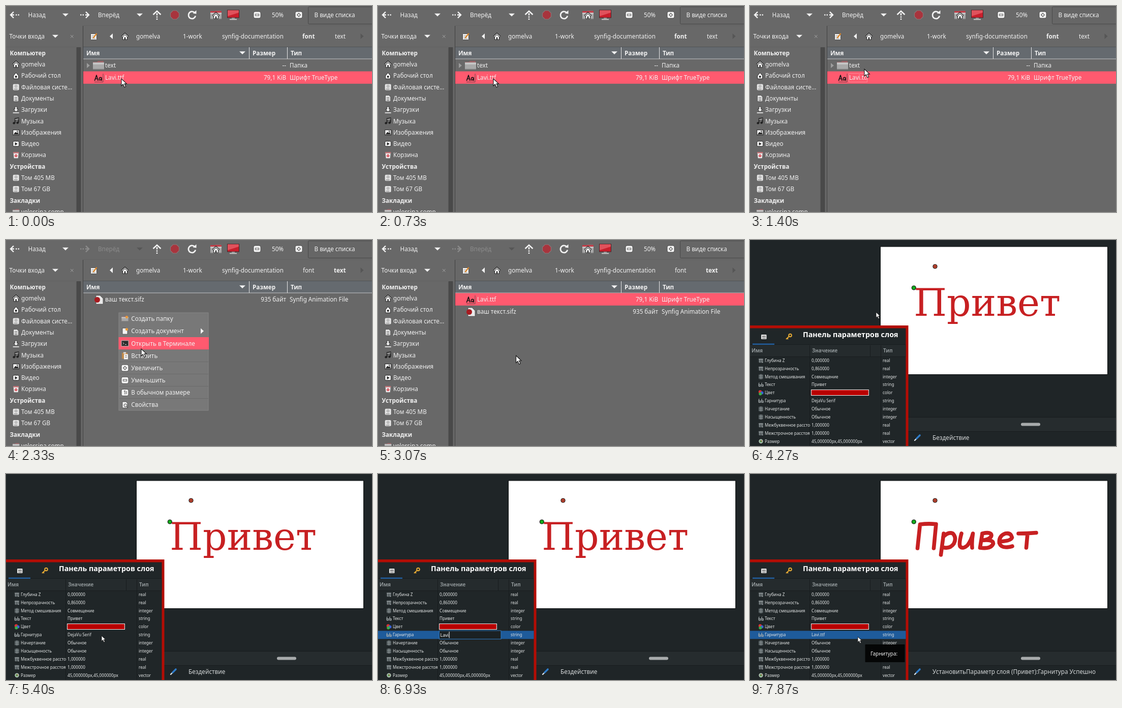
Write an HTML page that moves like this. It is 720 px wide and 405 px high and loops after 8000 ms.

```html
<!DOCTYPE html>
<html lang="ru">
<head>
<meta charset="utf-8">
<title>Установка шрифта</title>
<style>
html, body { margin: 0; width: 100%; height: 100%; overflow: hidden; background: #686868; }
svg { display: block; width: 100%; height: 100%; }
text { font-family: "Noto Sans", "Open Sans", sans-serif; font-size: 11.7px; fill: #f2f2f2; white-space: pre; }
.b { font-weight: 700; }
.param text { font-size: 8.2px; fill: #e3e6e6; }
.param .head { font-size: 9.8px; font-weight: 700; fill: #8f9698; }
</style>
</head>
<body>
<svg id="stage" viewBox="0 0 720 405" preserveAspectRatio="none"></svg>
<script>
const LOOP = 8000, RED = '#ff5a6f', INK = '#f2f2f2', OFF = '#565656';
const OPEN = 1670, MENU = 2030, PASTE = 2700, PICK = 3930, EDITOR = 4200;
const ROW = 5730, ENTRY = 6130, APPLY = 7330, TIP = 7730;

const attrs = o => Object.entries(o).map(([k, v]) => ` ${k}="${v}"`).join('');
const text = (x, y, s, o = {}) => `<text x="${x}" y="${y + 4.2}"${attrs(o)}>${s}</text>`;
const rect = (x, y, w, h, fill, o = {}) =>
  `<rect x="${x}" y="${y}" width="${w}" height="${h}" fill="${fill}"${attrs(o)}/>`;
const path = (d, fill, o = {}) => `<path d="${d}" fill="${fill}"${attrs(o)}/>`;
const line = (d, stroke, w = 1, o = {}) => path(d, 'none', { stroke, 'stroke-width': w, ...o });
const dot = (x, y, r, fill, o = {}) => `<circle cx="${x}" cy="${y}" r="${r}" fill="${fill}"${attrs(o)}/>`;
const at = (x, y, s, scale = 1) => `<g transform="translate(${x} ${y}) scale(${scale})">${s}</g>`;
const group = (id, s) => `<g id="${id}">${s}</g>`;
const bold = { class: 'b' };
const round = { 'stroke-linecap': 'round', 'stroke-linejoin': 'round' };

// Icons are drawn around their own centre
const triangle = 'M-6 -2.8H6L0 3Z';
const triDown = path(triangle, INK);
const arrow = line('M-2 -6L-8 0L-2 6M-7 0H-1', INK, 2.4) +
  rect(2, -1.2, 2.4, 2.4, INK) + rect(6.5, -1.2, 2.4, 2.4, INK);
const house = path('M-4.5 0L0 -4L4.5 0V6H-4.5Z', '#f4f4f4', { stroke: '#222', 'stroke-width': 1 }) +
  line('M-6.5 0.5L0 -5.5L6.5 0.5', '#222', 3.2) + line('M-6 0.2L0 -5.2L6 0.2', '#f4f4f4', 1.2) +
  rect(-1.3, 1.5, 2.6, 4.5, '#333');
const folder = path('M-11 -7H-3L-1 -9H10V8H-11Z', '#9b6468') + rect(-11, -6, 22, 14, '#a9a9a9', { rx: 1 }) +
  rect(-11, -6, 22, 4, '#c4c4c4') + rect(-11, 6.5, 22, 1.5, '#888');
const square = s => rect(-7, -6.5, 14, 13, '#f3f3f3', { rx: 3, stroke: '#3d3d3d', 'stroke-width': .8 }) + s;
const minus = square(rect(-3.5, -1.5, 7, 3, '#fff', { stroke: '#555' }));
const plus = square(line('M0 -3.3L3.3 0L0 3.3L-3.3 0Z', '#555', 1.2));
const drive = rect(-6, -6, 12, 12, '#e6e6e6', { rx: 2 }) + dot(0, -1.5, 3.2, '#bdbdbd') + line('M-4 4H3', '#888', 1.4);
const sheet = path('M-5 -6H2L5 -3V6H-5Z', '#f3f3f3', { stroke: '#333', 'stroke-width': .7 });
const lines = line('M-3 -2H3M-3 1H3M-3 3.8H3', '#444');
const spark = dot(3.5, -3.5, 2.6, '#e89a3c');
const side = {
  house, drive, doc: sheet + lines, folder: at(0, 0, folder, .6),
  desk: path('M-5 0L0 -6L5 0V6H-5Z', '#f3f3f3', { stroke: '#222' }) + dot(0, 2, 2, '#222'),
  down: path('M-2 -6H2V-1H5L0 4L-5 -1H-2Z', '#f3f3f3', { stroke: '#222', 'stroke-width': .8 }) + line('M-6 6H6', INK, 1.6),
  note: line('M-2 4V-5L5 -6V3', '#222', 1.8) + dot(-4, 4, 2.3, '#222') + dot(3, 3.2, 2.3, '#222') + line('M-2 -3.4L5 -4.4', '#ddd'),
  image: rect(-6, -5, 12, 10, '#f3f3f3', { stroke: '#222' }) + path('M-5 4L-1 -1L1 1L3 -1L5 4Z', '#222') + dot(2.5, -2.5, 1.2, '#222'),
  video: rect(-6, -5, 12, 10, '#f3f3f3', { rx: 2, stroke: '#222' }) + path('M-2 -3L3 0L-2 3Z', '#222'),
  bin: path('M-5 -4H5L4 6H-4Z', '#eee') + rect(-5.5, -6, 11, 2.4, '#c9767b') + dot(0, 1.2, 2.6, '#d43a45') + dot(0, 1.2, 1, '#eee')
};
const glyphs = line('M-7.5 5.5L-4 -5L-1 5.5M-6.5 2H-2M6 0Q1.5 -2 1.2 3Q3 7.5 6 1V5.5', '#161616', 1.7, round) + line('M9 -8V8.5H-8', '#444', .8);
const synfile = path('M-5 -8H3L9 -2V9H-5Z', '#e9e9e9', { stroke: '#444', 'stroke-width': .7 }) + dot(-2.5, .5, 5.5, '#a71b20');

const sidebar = [
  ['Компьютер'], ['gomelva', 'house'], ['Рабочий стол', 'desk'], ['Файловая систе...', 'drive'],
  ['Документы', 'doc'], ['Загрузки', 'down'], ['Музыка', 'note'], ['Изображения', 'image'],
  ['Видео', 'video'], ['Корзина', 'bin'], ['Устройства'], ['Том 405 MB', 'drive'],
  ['Том 67 GB', 'drive'], ['Закладки'], ['velorsina comp', 'folder']
].map(([s, icon], i) => {
  const y = 92.5 + i * 22.3;
  return icon ? at(19.7, y, side[icon]) + text(30, y, s) : text(7.4, y, s, bold);
}).join('');

const toolbar =
  at(17, 17.5, arrow) + text(43.5, 18, 'Назад') + at(117, 17.5, triDown) +
  group('forward', at(155, 17.5, `<g transform="scale(-1 1)">${arrow}</g>`) + text(181, 18, 'Вперёд')) +
  at(263, 17.5, path(triangle, INK, { id: 'forwardMore' })) +
  at(297, 18, line('M-7.5 -1L0 -8L7.5 -1', INK, 2.6) + rect(-1.3, -4, 2.6, 4.5, INK) + rect(-1.3, 2.4, 2.6, 2.4, INK) + rect(-1.3, 6.6, 2.6, 2.4, INK)) +
  at(332, 17.5, path('M-3.5 -8.5H3.5L8.5 -3.5V3.5L3.5 8.5H-3.5L-8.5 3.5V-3.5Z', '#a8343d', { stroke: '#8d7476', 'stroke-width': 1.2 })) +
  at(366, 17.5, line('M5 -4.5A7 7 0 1 0 6.8 2', INK, 2.8) + path('M1.5 -3L8.5 -9V-2Z', INK)) +
  at(413, 18, folder + rect(-11, -8, 22, 3, '#c43d48') + at(0, 1, house)) +
  at(447, 17, rect(-11.5, -9, 23, 15, '#c81f2c', { stroke: '#40272a' }) + path('M-11 -8.5H11V-4L-11 3Z', '#e0525c') + rect(-3, 6, 6, 2.5, '#999') + rect(-7, 8.5, 14, 1.8, '#ccc')) +
  at(494, 17.5, minus) + text(523, 18, '50%') + at(576, 17.5, plus) +
  rect(594.5, 1.5, 140, 34, '#666', { stroke: '#474747', rx: 2 }) + text(606.5, 18, 'В виде списка');

const places =
  text(6.5, 60, 'Точки входа') + at(97, 59.5, triDown) + line('M127 57L132.5 62.5M132.5 57L127 62.5', '#a5a5a5') +
  at(172.5, 60, rect(-6, -5.5, 12, 12, '#f3f3f3', { rx: 1, stroke: '#333', 'stroke-width': .8 }) + line('M-4 -2H1M-4 1H0M-4 4H4', '#999') + line('M-1 3L6 -6', '#d9862a', 2.6)) +
  path('M210 54V65L204 59.5Z', INK) + at(234, 60, house) +
  text(256, 60, 'gomelva') + text(348, 60, '1-work') + text(425, 60, 'synfig-documentation') +
  group('crumbFont', text(583, 60, 'font', bold) + text(647, 60, 'text')) +
  group('crumbText', text(584, 60, 'font') + text(645, 60, 'text', bold)) +
  path('M697.5 54V65L703.5 59.5Z', OFF);

const fileRow = (id, icon, name, size, type) =>
  group(id, at(182, 0, icon) + text(195, 0, name) + text(551, 0, size, { 'text-anchor': 'end' }) + text(558, 0, type));

const list =
  rect(152, 81, 568, 23, '#656a6f') + line('M152 80.5H720', '#505356') + line('M152 104H720', '#c4c6c8') +
  line('M478.5 81V104M553.5 81V104', '#e8e8e8') +
  text(158, 92.5, 'Имя', bold) + at(465, 92, triDown) + text(485, 92.5, 'Размер', bold) + text(560, 92.5, 'Тип', bold) +
  rect(152, 128.5, 568, 24.3, RED, { id: 'selected' }) +
  fileRow('dir', folder + path('M-23 -5V5L-17 0Z', '#9c9c9c'), 'text', '--', 'Папка') +
  fileRow('lavi', glyphs, 'Lavi.ttf', '79,1 KiB', 'Шрифт TrueType') +
  fileRow('sifz', synfile, 'ваш текст.sifz', '935 байт', 'Synfig Animation File') +
  rect(194.5, 132.5, 36, 17, 'none', { id: 'focus', stroke: '#ffb4bd', 'stroke-dasharray': '1 1' });

const menuItems = [
  ['Создать папку', at(0, 0, folder, .6) + spark],
  ['Создать документ', sheet + spark],
  ['Открыть в Терминале', rect(-7, -5.5, 14, 11, '#2b2b2b', { stroke: '#bbb' }) + line('M-4 -2L-2 0L-4 2M0 2H3', '#eee')],
  ['Вставить', rect(-6, -6, 11, 12, '#c08a4a', { rx: 1 }) + rect(-3, -7, 5, 3, '#ddd') + rect(-2, -3, 8, 10, '#f3f3f3') + line('M0 0H4M0 3H4', '#777')],
  ['Увеличить', plus], ['Уменьшить', minus],
  ['В обычном размере', square(line('M-2 -2.5L0 -3.5V3.5M3 -3V3', '#666', 1.2))],
  ['Свойства', sheet + dot(1, 1, 3, '#ddd', { stroke: '#555' }) + line('M3 3L6 6', '#555', 1.5)]
];
const menu = rect(222, 143, 176, 192, '#787878', { stroke: '#858585' }) +
  line('M223 215.5H398M223 239.5H398M223 263.5H398M223 287.5H398M223 311.5H398', '#6b6b6b') +
  rect(221.5, 191, 177.5, 24.3, RED, { id: 'hover' }) +
  menuItems.map(([s, icon], i) => at(234, 155 + i * 24.15, icon) + text(246.3, 155 + i * 24.15, s)).join('') +
  path('M383 173.5V184.5L389 179Z', INK);

const files = group('files',
  rect(0, 0, 720, 405, '#686868') + toolbar + places +
  rect(138.5, 81, 9, 330, '#494949', { rx: 1 }) +
  line('M0 80.5H138', '#626262') + line('M151.5 39V405', '#3f3f3f') + line('M152 38.5H720', '#626262') +
  sidebar + list + group('menu', menu));

// Layer parameter icons
const grey = '#a4abad';
const pi = rect(-5, -4.5, 10, 9, '#454c4f', { rx: 2 }) + line('M-4 -2.5H4M-2 -2V4M2 -2V3Q2 4 4 3.5', grey, 1.2);
const num = rect(-4.5, -5, 9, 10, '#4d5558', { rx: 2 }) + line('M-4 -1.5H4M-4 2H4M0 -5V5', grey, .8);
const quote = line('M-3.5 -4Q-5 0 -4 3H-1V0H-4M2 -4Q.5 0 1.5 3H4.5V0H1.5', grey, 1.3);
const hue = dot(-1.5, -2, 3.2, '#d33') + dot(2, 0, 3, '#3a62d8') + dot(-1.2, 2, 3, '#3cae4a');
const vec = dot(0, 0, 4.2, '#b8c4b8') + dot(0, 0, 2.4, '#4d9b52') + dot(.8, -.8, 1, '#d44');
const params = [
  [pi, 'Глубина Z', '0,000000', 'real'], [pi, 'Непрозрачность', '0,860000', 'real'],
  [num, 'Метод смешивания', 'Совмещение', 'integer'], [quote, 'Текст', 'Привет', 'string'],
  [hue, 'Цвет', '', 'color'], [quote, 'Гарнитура', '', 'string'],
  [num, 'Начертание', 'Обычное', 'integer'], [num, 'Насыщенность', 'Обычное', 'integer'],
  [pi, 'Межбуквенное рассто', '1,000000', 'real'], [pi, 'Межстрочное расстоя', '1,000000', 'real'],
  [vec, 'Размер', '45,000000px,45,000000px', 'vector']
].map(([icon, name, value, type], i) => {
  const y = 236.4 + i * 15.87;
  return at(21.5, y + .6, icon) + text(29, y - .8, name) + text(121, y - .8, value) + text(261, y - .8, type);
}).join('');

const panel =
  rect(0, 168, 311.5, 237, '#b30d05') + rect(0, 173.5, 306.5, 231.5, '#202628') +
  rect(0, 206, 306.5, 23, '#252b2d') + line('M0 205.5H306M0 229.5H306', '#181d1f') +
  line('M117.5 207V405M236.5 207V229M257.5 207V405', '#171c1e') + rect(5, 203.5, 43, 2.5, '#215d9c') +
  rect(22, 186, 10.5, 9, '#e6e6e6', { rx: 1 }) + line('M24 188L25.5 191L27 188M28 188V191M30 188V191M24 193H31', '#333', .9) +
  dot(79, 187.5, 2.8, 'none', { stroke: '#e7ab35', 'stroke-width': 2 }) + line('M77 189.5L71 195M73 193L75 195', '#e7ab35', 2) +
  text(104, 186.8, 'Панель параметров слоя', { style: 'font-size:14.3px;font-weight:700;fill:#fff' }) +
  [[3, 'Имя'], [122, 'Значение'], [262, 'Тип']].map(([x, s]) => text(x, 217, s, { class: 'head' })).join('') +
  rect(0, 308.3, 306.5, 16, '#1e5b9b', { id: 'row' }) + params +
  rect(120.5, 294.5, 113, 11, '#b90000', { stroke: '#f0f0f0' }) +
  text(121, 315, '', { id: 'family' }) +
  group('entry', rect(120.5, 308, 121.5, 16.5, '#1b2123', { stroke: '#3279c0' }) +
    rect(122, 310, 55, 12.5, '#215d9c', { id: 'marked' }) +
    text(122.5, 315.5, '', { id: 'typed', style: 'font-size:9px;fill:#fff' }) +
    rect(140, 310, 1, 12.5, '#fff', { id: 'caret' }));

const hand = 'M329.5 146L334.5 99Q350 97 366 98.5L361.5 146' +
  'M381 117L375.5 159M380 124Q390 113 399 117Q407 125 401 137Q393 148 379 144' +
  'M416 117Q411 135 413 142Q418 149 428 140Q435 131 438.5 117Q436 133 437 145' +
  'M457 117L452.5 145M457 117Q475 113 475 121Q473 129 456 130.5Q479 128 478.5 137Q474 148 452.5 145' +
  'M491 132.5Q513 132 515.5 125Q513 114.5 502 117Q489 122 490.5 136Q495 148 516 142' +
  'M528 117Q546 117 563 115.5M546 117L543.5 145';
const outline = { stroke: '#111', 'stroke-width': 1.2 };
const editor = group('editor',
  rect(0, 0, 720, 405, '#1f2527') + rect(256.5, 13, 447, 251.5, '#fff', { stroke: '#0b0e0f' }) +
  text(322.3, 144.8, 'Привет', { id: 'serif', style: "font-family:'DejaVu Serif',serif;font-size:74.3px;fill:#c72022" }) +
  line(hand, '#c72022', 7.6, { id: 'hand', ...round }) +
  dot(364, 52, 4, '#c6432d', outline) + dot(364, 52, 1.3, '#7d3a2c') + dot(322.3, 94, 4, '#12ac1d', outline) +
  rect(311, 349, 409, 27, '#262c2e') + line('M311 348.5H720M311 376.5H720', '#171c1e') +
  rect(533, 359.5, 38, 6, '#a8abac', { rx: 3 }) +
  line('M324 394L328 390', '#d9e2e8', 2.4, round) + line('M328 390L334 384', '#2f7bc8', 3.6, round) +
  text(359, 389, '', { id: 'status', style: 'fill:#d5d8d9' }) +
  `<g class="param">${panel}</g>` +
  group('tip', rect(226.5, 335, 78, 35, '#050606', { rx: 1 }) + text(237, 352.5, 'Гарнитура:', { style: 'font-size:10px' })));

const pointer = path('M0 0V14L3.4 10.8L6 16.8L8.6 15.6L6 9.9H10.4Z', '#fff', { id: 'pointer', stroke: '#151515', 'stroke-width': 1.1 });

document.getElementById('stage').innerHTML = files + editor + pointer;
const ui = {};
document.querySelectorAll('#stage [id]').forEach(e => ui[e.id] = e);
const show = (id, on) => ui[id].setAttribute('display', on ? 'inline' : 'none');
const move = (id, x, y, s = 1) => ui[id].setAttribute('transform', `translate(${x} ${y}) scale(${s})`);
const write = (id, s) => { if (ui[id].textContent !== s) ui[id].textContent = s; };

const track = [
  [0, 227, 143], [930, 227, 143], [1400, 225, 124], [1530, 214, 117], [1730, 214, 117],
  [1970, 222, 143], [2070, 222, 143], [2330, 266, 214], [2500, 272, 229],
  [3000, 272, 229], [3870, 248, 142], [5070, 248, 142], [5380, 188, 318], [7200, 188, 318], [7400, 212, 320], [LOOP, 212, 320]
];
function pointerAt(t) {
  const i = track.findIndex(k => k[0] > t), [t0, x0, y0] = track[i - 1], [t1, x1, y1] = track[i];
  const p = (t - t0) / (t1 - t0), e = p * p * (3 - 2 * p);
  return [x0 + (x1 - x0) * e, y0 + (y1 - y0) * e];
}

const keys = [6670, 6870, 6930, 6930, 7070, 7130, 7200, 7270];

function drawFiles(t, y) {
  const inside = t >= OPEN, pasted = t >= PASTE;
  ui.forward.setAttribute('opacity', inside ? .25 : 1);
  ui.forwardMore.setAttribute('fill', inside ? OFF : INK);
  show('crumbFont', !inside);
  show('crumbText', inside);
  show('dir', !inside);
  show('lavi', !inside || pasted);
  show('sifz', inside);
  move('dir', 0, 117);
  move('lavi', 0, inside ? 117 : 141);
  move('sifz', 0, pasted ? 141 : 117);

  const top = t < 1600 || t >= PICK ? 128.5 : 104.5;
  show('selected', !inside || pasted);
  ui.selected.setAttribute('y', top);
  show('focus', t >= 930 && t < 1600 || t >= PICK);
  ui.focus.setAttribute('width', t >= PICK ? 76 : 36);

  show('menu', t >= MENU && t < 2670);
  const item = Math.max(0, Math.min(7, Math.floor((y - 143) / 24.15)));
  ui.hover.setAttribute('y', 142.7 + item * 24.15);
}

function drawEditor(t) {
  const done = t >= APPLY, typing = t >= ENTRY && !done;
  const count = keys.filter(k => t >= k).length;
  show('row', t >= ROW);
  show('entry', typing);
  show('marked', !count);
  show('caret', count > 0);
  show('serif', !done);
  show('hand', done);
  show('tip', t >= TIP);
  write('family', done ? 'Lavi.ttf' : 'DejaVu Serif');
  write('typed', count ? 'Lavi.ttf'.slice(0, count) : 'DejaVu Serif');
  write('status', done ? 'УстановитьПараметр слоя (Привет):Гарнитура Успешно' : 'Бездействие');
  if (typing) {
    const w = ui.typed.getComputedTextLength();
    ui.caret.setAttribute('x', 123 + w);
    ui.marked.setAttribute('width', w + 1);
  }
}

function draw(t) {
  const [x, y] = pointerAt(t), editing = t >= EDITOR;
  show('files', !editing);
  show('editor', editing);
  if (editing) drawEditor(t); else drawFiles(t, y);
  move('pointer', x, y, editing ? .76 : 1);
  show('pointer', t < keys[0] || t >= 7200);
}

const start = performance.now();
function tick() {
  draw((performance.now() - start) % LOOP);
  requestAnimationFrame(tick);
}
tick();
</script>
</body>
</html>
```
